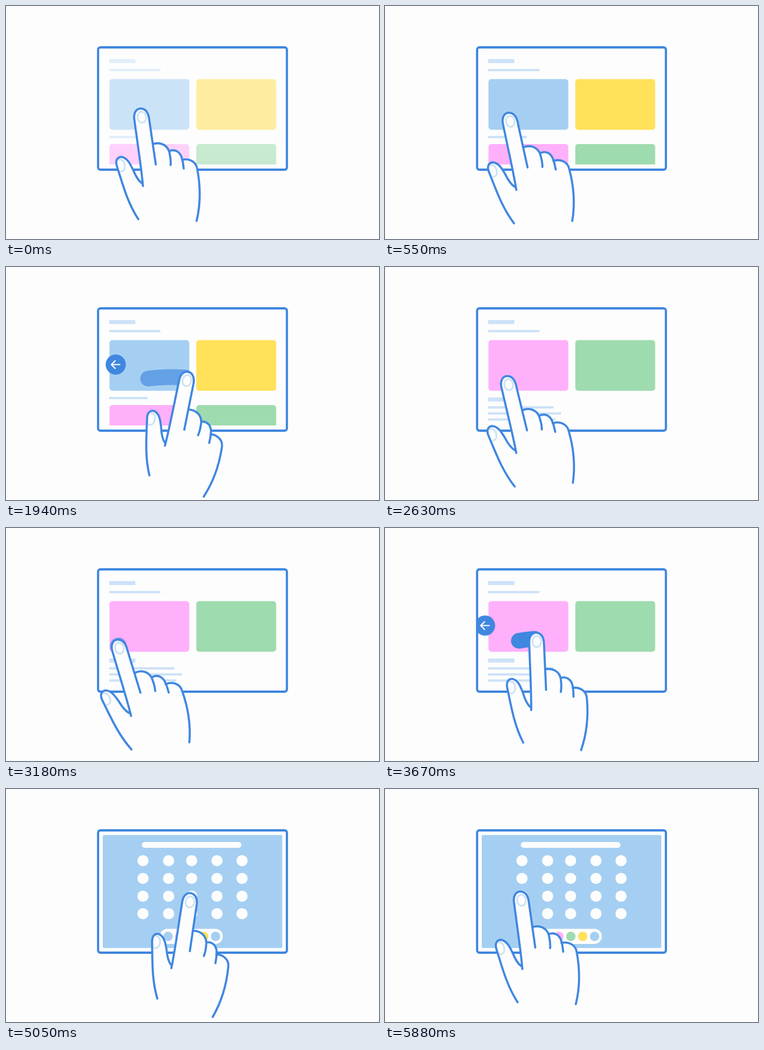
An HTML page for the animation above (5950 ms loop, 640 by 400 pixels).

```html
<!DOCTYPE html>
<html lang="en">
<head>
<meta charset="utf-8">
<title>Swipe gestures</title>
<style>
  html, body { margin: 0; width: 100%; height: 100%; overflow: hidden; background: #fdfdfd; }
  svg { display: block; width: 100vw; height: 100vh; }
  .line { fill: none; stroke: #4087e0; stroke-width: 3.6; stroke-linecap: round; stroke-linejoin: round; }
  .nail { fill: none; stroke: #cfe2f4; stroke-width: 3; stroke-linecap: round; }
</style>
</head>
<body>
<svg viewBox="0 0 640 400">
  <defs>
    <clipPath id="screen"><rect x="158" y="71" width="324" height="210" rx="4"/></clipPath>
    <clipPath id="content"><rect x="166" y="79" width="308" height="193"/></clipPath>
  </defs>
  <rect x="158" y="71" width="324" height="210" rx="4" fill="#fdfdfd"/>
  <g clip-path="url(#screen)">
    <g id="gallery" clip-path="url(#content)"></g>
    <g id="article"></g>
    <g id="home"></g>
    <path id="trail" fill="none" stroke="#4087e0" stroke-width="27" stroke-linecap="round" stroke-linejoin="round"/>
    <g id="back">
      <circle r="17.3" fill="#4087e0"/>
      <path d="M7 0H-7M-1 -6.5L-7.5 0L-1 6.5" fill="none" stroke="#fff" stroke-width="2.2" stroke-linecap="round" stroke-linejoin="round"/>
    </g>
  </g>
  <rect class="line" x="158" y="71" width="324" height="210" rx="4" style="stroke-width:3.8"/>
  <g id="hand">
    <path fill="#fdfdfd" d="M227 366C208 337 200 305 190 274C187 263 193 259 198 259C208 260.5 213 271 218 281C222 291 226 299 233 304L220 193C219 183 224 176 231 176C239 176 243 182 245 190L252 237C264 233 276 238 280 249C290 245 299 250 302 264C314 261 326 267 328 279C334 310 334 340 327 369Z"/>
    <ellipse class="nail" cx="233" cy="191" rx="7.5" ry="9.5" transform="rotate(-5 233 191)"/>
    <path class="nail" d="M194 264C200 262 204 269 204 276C204 281 201 284 197 284"/>
    <path class="line" d="M227 366C208 337 200 305 190 274C187 263 193 259 198 259C208 260.5 213 271 218 281C222 291 226 299 233 304"/>
    <path class="line" d="M235 309C232 275 224 225 220 193C219 183 224 176 231 176C239 176 243 182 245 190L257 272"/>
    <path class="line" d="M252 237C264 233 276 238 280 250C282 258 283 266 282.5 273"/>
    <path class="line" d="M280 249C290 245 299 250 302 262C304 268 304 274 305 279"/>
    <path class="line" d="M302 264C314 261 326 267 328 279C334 310 334 340 327 369"/>
  </g>
</svg>
<script>
const LOOP = 5950;
const BLUE = '#a5cff2', YELLOW = '#ffe15a', PINK = '#ffb0fb', GREEN = '#9edbae', TEXT = '#cde2f8', WHITE = '#fdfdfd';
const $ = id => document.getElementById(id);
const clamp = v => Math.max(0, Math.min(1, v));
const span = (t, from, to) => clamp((t - from) / (to - from));
const sine = u => (1 - Math.cos(Math.PI * u)) / 2;
const cubic = u => u < .5 ? 4 * u ** 3 : 1 - 4 * (1 - u) ** 3;
const mix = (a, b, u) => a.map((v, i) => v + (b[i] - v) * u);

const rect = (x, y, w, h, fill, r = 0) =>
  `<rect x="${x}" y="${y}" width="${w}" height="${h}" rx="${r}" fill="${fill}"/>`;
const dot = (x, y, r, fill) => `<circle cx="${x}" cy="${y}" r="${r}" fill="${fill}"/>`;
const cards = (y, left, right) => rect(177.5, y, 137, 87, left, 5) + rect(326.5, y, 137, 87, right, 5);
const header = rect(177, 91, 45, 7, TEXT) + rect(177, 108, 88, 4, TEXT);

$('gallery').innerHTML = header + cards(125.5, BLUE, YELLOW) +
  rect(177, 223, 66, 4, TEXT) + cards(237, PINK, GREEN);
$('article').innerHTML = header + cards(125.5, PINK, GREEN) + rect(177, 224, 45, 7, TEXT) +
  [112, 125, 115].map((w, i) => rect(177, 239 + i * 10.4, w, 4, TEXT)).join('');
$('home').innerHTML = rect(166, 79, 308, 194, BLUE, 2) + rect(233, 91, 171, 10, WHITE, 5) +
  [123, 153.5, 184, 214].map(y => [235, 279, 318.5, 362, 405].map(x => dot(x, y, 9.6, WHITE)).join('')).join('') +
  rect(264, 240, 108, 26, WHITE, 13) +
  [BLUE, PINK, GREEN, YELLOW, BLUE].map((c, i) => dot(278 + i * 20.4, 253, 8, c)).join('');

// Poses are [x, y, angle] of the index fingertip.
const swipePose = e => [192 + 123 * e, 206 - 34.2 * e + 22.6 * e * e, -9.2 + 22.4 * e + 7.7 * e * e];
const TAP = [233, 190, 0], HOLD = [316, 193, 16.7];
const swipes = [
  { start: 1400, end: 2080, ease: cubic, lag: 220, fade: [.7, .97] },
  { start: 3080, end: 4180, ease: sine, lag: 180, fade: [.8, 1] }
];
const progress = (s, t) => s.ease(span(t, s.start, s.end));

function pose(t) {
  if (t < 1400) return mix(TAP, swipePose(0), sine(span(t, 250, 900)));
  if (t < 2130) return swipePose(progress(swipes[0], t));
  if (t < 3080) return swipePose(1 - sine(span(t, 2130, 2812)));
  if (t < 4300) return swipePose(progress(swipes[1], t));
  if (t < 5050) return mix(swipePose(1), HOLD, sine(span(t, 4300, 4900)));
  return mix(HOLD, TAP, sine(span(t, 5050, LOOP)));
}

function showPage(id, t, from, to) {
  $(id).setAttribute('opacity', t >= from && t < to ? span(t, from, from + 170) : 0);
}

// The trail spans the recent fingertip path and ends just behind the finger.
function drawSwipe(t) {
  const s = swipes[t < 2800 ? 0 : 1];
  const u = span(t, s.start, s.end);
  const points = [];
  for (let i = 0; i <= 16; i++) {
    const [x, y] = swipePose(progress(s, t - 25 - (s.lag - 25) * (1 - i / 16)));
    points.push(`${x.toFixed(1)} ${(y - 4).toFixed(1)}`);
  }
  $('trail').setAttribute('d', 'M' + points.join('L'));
  $('trail').setAttribute('opacity', clamp(u / .15) * (1 - span(u, ...s.fade)));
  const out = Math.min(1, 1.2 * progress(s, t)) * (1 - sine(span(t, s.end + 40, s.end + 260)));
  $('back').setAttribute('transform', `translate(${138 + 50.3 * out} 167.5)`);
}

function render(t) {
  showPage('gallery', t, -95, 2150);
  showPage('article', t, 2150, 4300);
  showPage('home', t, 4300, LOOP);
  drawSwipe(t);
  const [x, y, angle] = pose(t);
  $('hand').setAttribute('transform', `translate(${x} ${y}) rotate(${angle}) translate(-233 -190)`);
}

const begin = performance.now();
function tick() {
  render((performance.now() - begin) % LOOP);
  requestAnimationFrame(tick);
}
tick();
</script>
</body>
</html>
```
